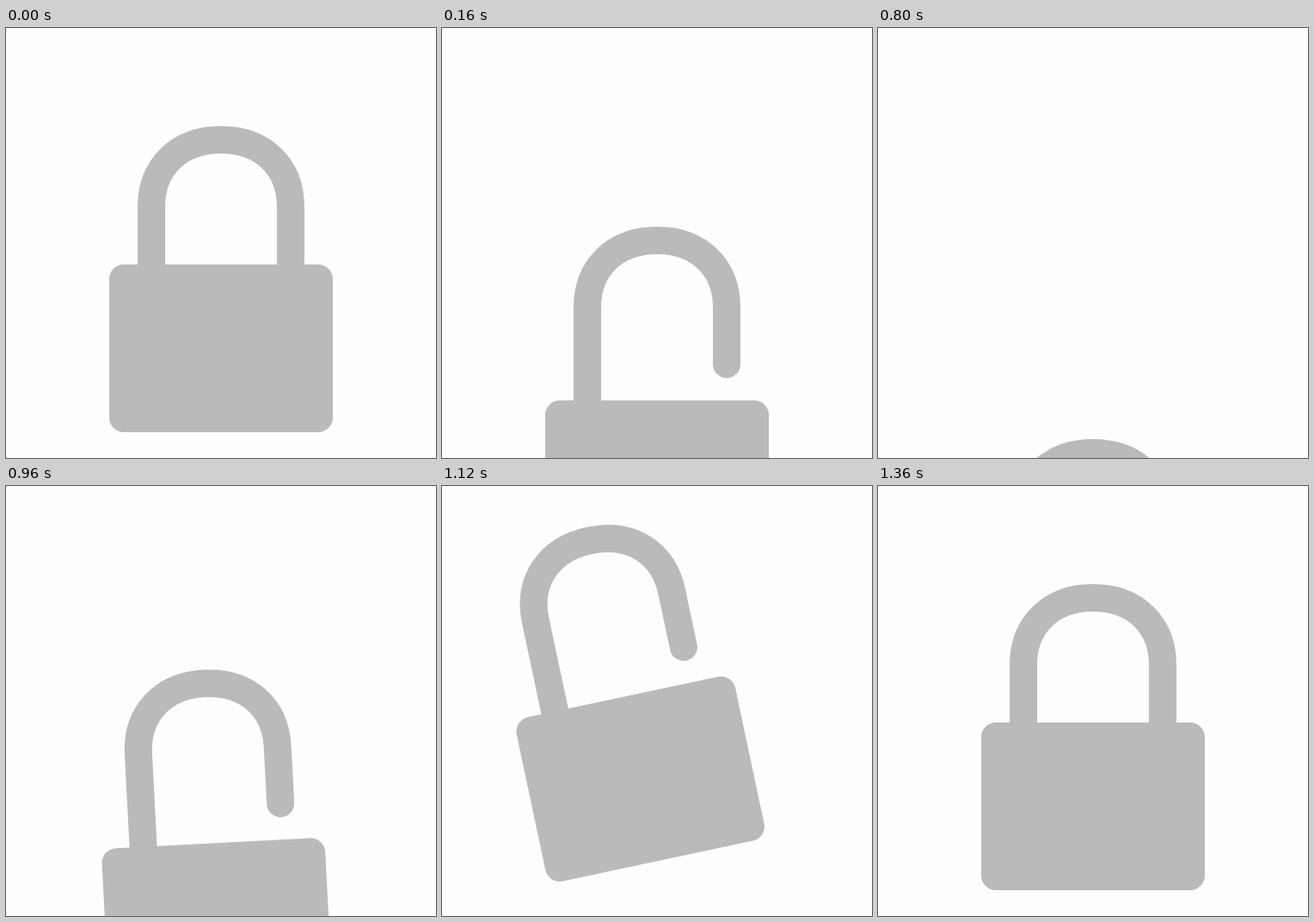
These frames come from a looping animation (500x500 px, 1.68 s). An HTML page with a canvas:

```html
<!DOCTYPE html>
<html lang="en">
<head>
<meta charset="utf-8">
<title>Padlock</title>
<style>
  html, body { margin: 0; width: 100%; height: 100%; overflow: hidden; background: #fefefe; }
  canvas { display: block; width: 100vw; height: 100vh; }
</style>
</head>
<body>
<canvas id="stage" width="500" height="500"></canvas>
<script>
const ctx = document.getElementById('stage').getContext('2d');
const LOOP = 1680, STEP = 80;
const GREY = '#bababa';
const PIVOT = { x: 136.5, y: 453.5 };
const LIFT = 41;

// Vertical offsets, one per step
const FALL = [0, 35, 158, 375];
const RISE = [405, 270, 146, 43, -10, 0];
const CLOSE = [LIFT, 36, 18, 0];
const RISE_AT = 10, TILT_AT = 11, CLOSE_AT = 14, REST_AT = 17;

function pose(i) {
  const hidden = i >= FALL.length && i < RISE_AT;
  let drop = 0, lift = 0, tilt = 0;
  if (i < FALL.length) drop = FALL[i];
  else if (i >= RISE_AT) drop = RISE[i - RISE_AT] || 0;

  if (i > 0 && i < CLOSE_AT) lift = LIFT;
  else if (i >= CLOSE_AT) lift = CLOSE[i - CLOSE_AT] || 0;

  // Lean to the left and back, 12 degrees at the peak
  if (i >= TILT_AT && i < REST_AT) {
    const p = (i - TILT_AT) / (REST_AT - TILT_AT);
    tilt = 6 * (1 - Math.cos(2 * Math.PI * p));
  }
  return { hidden, drop, lift, tilt };
}

function drawShackle(lift) {
  const left = 169, mid = 250, right = 331;
  const top = 130 - lift, side = 208 - lift;
  const hx = (right - mid) * 0.6, hy = (side - top) * 0.6;
  ctx.beginPath();
  ctx.moveTo(left, 330 - lift);
  ctx.lineTo(left, side);
  ctx.bezierCurveTo(left, side - hy, mid - hx, top, mid, top);
  ctx.bezierCurveTo(mid + hx, top, right, side - hy, right, side);
  ctx.lineTo(right, 274 - lift);
  ctx.lineWidth = 32;
  ctx.lineCap = 'round';
  ctx.strokeStyle = GREY;
  ctx.stroke();
}

function drawBody() {
  ctx.beginPath();
  ctx.roundRect(120, 275, 260, 195, 17);
  ctx.fillStyle = GREY;
  ctx.fill();
}

function draw(time) {
  const { hidden, drop, lift, tilt } = pose(Math.floor((time % LOOP) / STEP));
  ctx.fillStyle = '#fefefe';
  ctx.fillRect(0, 0, 500, 500);
  if (hidden) return;
  ctx.save();
  ctx.translate(PIVOT.x, PIVOT.y + drop);
  ctx.rotate(-tilt * Math.PI / 180);
  ctx.translate(-PIVOT.x, -PIVOT.y);
  drawShackle(lift);
  drawBody();
  ctx.restore();
}

const start = performance.now();
function tick() {
  draw(performance.now() - start);
  requestAnimationFrame(tick);
}
tick();
</script>
</body>
</html>
```
